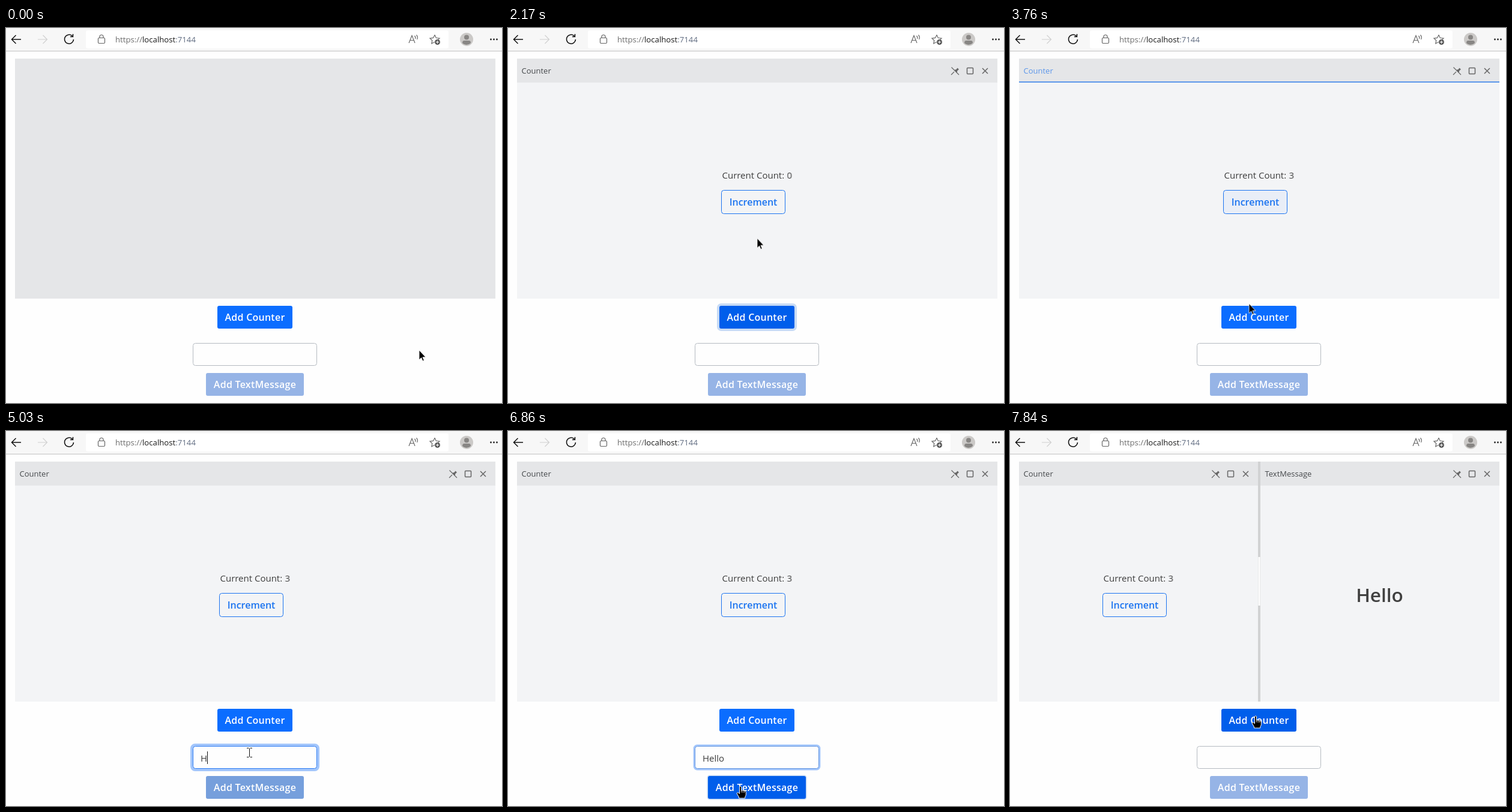
Animation of 826 by 625 pixels, one loop 8 s. Source, as an HTML page:

```html
<!DOCTYPE html>
<html lang="en">
<head>
<meta charset="utf-8">
<title>Dock panels</title>
<style>
html, body { margin: 0; width: 100%; height: 100%; overflow: hidden; background: #fefefe; }
svg { display: block; }
text { font-family: "Open Sans", "Noto Sans", sans-serif; white-space: pre; }
.line { fill: none; stroke: #666; stroke-width: 1.2; }
.title { font-size: 13px; fill: #45484b; }
.body { font-size: 15px; fill: #3c3c3c; }
.label { font-size: 16px; font-weight: 600; text-anchor: middle; fill: #fff; }
.ring { fill: none; stroke-width: 0; }

#stage * { animation-duration: 8s; animation-iteration-count: infinite; animation-timing-function: linear; }
#stage .step { animation-timing-function: step-end; }

#pane { animation-name: pane; }
@keyframes pane { 0% { opacity: 0 } 18.75%, 100% { opacity: 1 } }
#second { animation-name: second; }
@keyframes second { 0% { opacity: 0 } 87.875%, 100% { opacity: 1 } }
#tools { animation-name: tools; }
@keyframes tools { 0% { transform: none } 87.875%, 100% { transform: translateX(-402px) } }
#content { animation-name: content; }
@keyframes content { 0% { transform: none } 87.875%, 100% { transform: translateX(-201px) } }

#name { animation-name: name; }
@keyframes name { 0%, 32.4%, 53.9%, 100% { fill: #45484b } 34%, 52% { fill: #5b96ea } }
#under { animation-name: under; }
@keyframes under { 0%, 32.4%, 53.9%, 100% { opacity: 0 } 34%, 52% { opacity: 1 } }
#inc { animation-name: inc; }
@keyframes inc { 0%, 28.4%, 53.9%, 100% { fill: #f3f4f6 } 30.2%, 52% { fill: #e9eef7 } }
#reel { animation-name: reel; }
@keyframes reel {
  0% { transform: none }
  32.4% { transform: translateY(-20px) }
  37% { transform: translateY(-40px) }
  41.75%, 100% { transform: translateY(-60px) }
}

#add { animation-name: add; }
@keyframes add {
  0%, 11.6%, 34.3%, 47.2%, 50%, 96.7% { fill: #0b6dff }
  13.4%, 32.4%, 98%, 100% { fill: #005eeb }
  48.2% { fill: #0766f6 }
}
#addRing { animation-name: addRing; stroke: #c8dbf5; }
@keyframes addRing { 0%, 18%, 34.3%, 100% { stroke-width: 0 } 19.5%, 32.4% { stroke-width: 8px } }

#field { animation-name: field; }
@keyframes field { 0%, 52%, 86.9%, 100% { stroke: #b5bac1 } 53.9%, 85% { stroke: #2b7bf3 } }
#fieldRing { animation-name: fieldRing; stroke: #a3c6fb; }
@keyframes fieldRing { 0%, 52%, 86.9%, 100% { stroke-width: 0 } 53.9%, 85% { stroke-width: 8px } }
#typing { animation-name: typing; }
@keyframes typing {
  0%, 87.875%, 100% { transform: none }
  62.875% { transform: translateX(11px) }
  64.375% { transform: translateX(19.5px) }
  67% { transform: translateX(23.3px) }
  68.5% { transform: translateX(27.1px) }
  70% { transform: translateX(36.3px) }
}
#caret { animation-name: caret; }
@keyframes caret {
  0%, 58.625%, 77.375%, 85%, 100% { opacity: 0 }
  52%, 62.875%, 83.25% { opacity: 1 }
}

#send { animation-name: send; }
@keyframes send {
  0%, 62.5%, 89.4%, 100% { fill: #96b4e6 }
  62.875% { fill: #779fdc }
  64.4%, 81.5% { fill: #0b6dff }
  83.4%, 87.875% { fill: #005eeb }
}
#sendRing { animation-name: sendRing; stroke: #c8dbf5; }
@keyframes sendRing { 0%, 85%, 88%, 100% { stroke-width: 0 } 86.9%, 87.875% { stroke-width: 8px } }

#cursor { animation-name: cursor; }
@keyframes cursor {
  0% { transform: translate(688px, 537px) }
  7.125% { transform: translate(688px, 537px); animation-timing-function: cubic-bezier(.4, 0, .55, .9) }
  12.625% { transform: translate(433px, 487px); animation-timing-function: ease-out }
  14.125% { transform: translate(418px, 482px) }
  24.875% { transform: translate(418px, 482px); animation-timing-function: cubic-bezier(.4, 0, .8, .7) }
  27.125% { transform: translate(415px, 351px); animation-timing-function: ease-out }
  30.25% { transform: translate(408px, 294px) }
  44.75% { transform: translate(408px, 294px); animation-timing-function: cubic-bezier(.4, 0, .8, .7) }
  47% { transform: translate(398px, 459px); animation-timing-function: ease-out }
  51% { transform: translate(405px, 536px) }
  79.625% { transform: translate(405px, 536px); animation-timing-function: ease-in-out }
  82.75% { transform: translate(387px, 592px) }
  93.75% { transform: translate(387px, 592px); animation-timing-function: ease-in-out }
  98%, 100% { transform: translate(409px, 475px) }
}
#arrow { animation-name: arrow; }
@keyframes arrow {
  0%, 25.6%, 45%, 48.2%, 80.9%, 89.4%, 96% { opacity: 1 }
  11.75%, 28.3%, 47.2%, 49.3%, 81.6%, 95.1%, 96.7%, 100% { opacity: 0 }
}
#hand { animation-name: hand; }
@keyframes hand {
  0%, 25.6%, 45%, 48.2%, 89.4% { opacity: 0 }
  11.75%, 28.3%, 47.2%, 81.6%, 96.7%, 100% { opacity: 1 }
  49.3% { opacity: 0 }
}
#beam { animation-name: beam; }
@keyframes beam { 0%, 80.9%, 96%, 100% { opacity: 0 } 49.3%, 95.1% { opacity: 1 } }
</style>
</head>
<body>
<svg id="stage" width="826" height="625" viewBox="0 0 826 625">
  <defs>
    <g id="icons" class="line">
      <path d="M738.5 65.5l12.5 12.5M738 78l5-5"/>
      <path d="M743 70l3.500-1 2-2.500 2.500 2.500-2.500 2-1 3.500z" fill="#666" stroke="none"/>
      <rect x="764.500" y="66.500" width="10" height="10" rx="1" stroke-width="1.500"/>
      <path d="M790 67l9 9M799 67l-9 9" stroke-width="1.500"/>
    </g>
  </defs>

  <!-- browser bar -->
  <rect width="826" height="38" fill="#f7f7f7"/>
  <rect y="38" width="826" height="1" fill="#c2c2c2"/>
  <rect x="133" y="4" width="604" height="30" rx="3" fill="#fff"/>
  <g class="line">
    <path d="M25 19H9.500M16.500 12l-7 7 7 7" stroke="#111" stroke-width="1.500"/>
    <path d="M53 19h15.500M61.500 12l7 7-7 7" stroke="#d0d0d0"/>
    <path d="M110.500 13.500A7.500 7.500 0 1 0 112.500 19M111.500 10v4.500H107" stroke="#111" stroke-width="1.500"/>
    <rect x="153.500" y="16.500" width="11" height="9" rx="1.500"/>
    <path d="M156 16v-1.500a3 3 0 0 1 6 0V16"/>
    <path d="M671 25l5-12.500 5 12.500M673 20.500h6M680.500 13q2 2 1 5M683.500 11.500q3 3.500 1 7.500"/>
    <path d="M714 11.500l2.300 5 5.700.6-4.200 3.800M713.500 23.500l-4.700 2.500 1-5.300-3.800-3.600 5.600-.7 2.400-4.900"/>
  </g>
  <circle cx="718.500" cy="23.500" r="4.500" fill="#5c5c5c"/>
  <path d="M716 23.500h5M718.500 21v5" stroke="#fff"/>
  <circle cx="767" cy="19" r="11" fill="#cbc9c7"/>
  <g fill="#888684">
    <circle cx="767" cy="15.500" r="4"/>
    <path d="M760 25q0-4 3-4h8q3 0 3 4-3 3-7 3t-7-3z"/>
  </g>
  <g fill="#222">
    <circle cx="807.500" cy="19" r="1.400"/><circle cx="812.500" cy="19" r="1.400"/><circle cx="817.500" cy="19" r="1.400"/>
  </g>
  <text x="182" y="24" font-size="13.200" fill="#6d6d6d">https://<tspan fill="#181818">localhost</tspan><tspan fill="#5f6b80">:7144</tspan></text>

  <!-- dock area -->
  <rect x="15" y="51" width="800" height="400" fill="#e5e6e8"/>
  <g id="pane" class="step">
    <rect x="15" y="91" width="800" height="360" fill="#f3f4f6"/>
    <text id="name" class="title" x="22.500" y="76">Counter</text>
    <rect id="under" x="15" y="89" width="800" height="2" fill="#5b96ea"/>
    <g id="tools" class="step"><use href="#icons"/></g>
    <g id="content" class="step">
      <text class="body" x="356.500" y="251">Current Count:</text>
      <svg x="464.500" y="236" width="12" height="20">
        <g id="reel" class="step body">
          <text y="15">0</text><text y="35">1</text><text y="55">2</text><text y="75">3</text>
        </g>
      </svg>
      <rect id="inc" x="355.500" y="270.500" width="106" height="39" rx="4" fill="#f3f4f6" stroke="#1a73f0"/>
      <text class="label" x="408.500" y="296" style="fill:#1a73f0">Increment</text>
    </g>
  </g>
  <g id="second" class="step">
    <rect x="413" y="51" width="4" height="400" fill="#d1d2d3"/>
    <rect x="413.500" y="210" width="3" height="81" fill="#fff"/>
    <text class="title" x="424.500" y="76">TextMessage</text>
    <use href="#icons"/>
    <text class="label" x="615.500" y="285" style="font-size:31.500px;fill:#404040">Hello</text>
  </g>

  <!-- form -->
  <rect id="addRing" class="ring" x="352" y="463" width="125" height="38" rx="3"/>
  <rect id="add" x="352" y="463" width="125" height="38" rx="3" fill="#0b6dff"/>
  <text class="label" x="414.500" y="488" letter-spacing=".25">Add Counter</text>

  <rect id="fieldRing" class="ring" x="311" y="525" width="207" height="38" rx="4"/>
  <rect id="field" x="311.500" y="525.500" width="206" height="37" rx="4" fill="#fefefe" stroke="#b5bac1"/>
  <text class="body" x="324" y="551">Hello</text>
  <g id="typing" class="step">
    <rect x="324" y="534" width="42" height="21" fill="#fefefe"/>
    <rect id="caret" class="step" x="324" y="534" width="1" height="21" fill="#111"/>
  </g>

  <rect id="sendRing" class="ring" x="333" y="575" width="163" height="38" rx="3"/>
  <rect id="send" x="333" y="575" width="163" height="38" rx="3" fill="#96b4e6"/>
  <text class="label" x="414.500" y="600" letter-spacing=".25">Add TextMessage</text>

  <!-- pointer -->
  <g id="cursor">
    <path id="arrow" class="step" d="M0 0V16l3.600-3.400 2.400 5.400 2.300-1-2.400-5.300H11z" stroke="#fff" stroke-width=".8"/>
    <g id="hand" class="step" stroke="#fff">
      <path d="M-1.500.8Q0-1.200 1.500.8V7q1.600-1 2.600.4 1.600-.8 2.600.5 2.200-.6 2.600 1.600V14q0 2-1.500 3.500V20H-2.500V18L-5.500 13q-1-2 .8-2.400 1.500 0 3.200 2z"/>
      <path d="M1.500 7v3.500M4.100 7.500v3.500M6.700 8v3" stroke-width=".8"/>
    </g>
    <path id="beam" class="step" d="M-4-7.500h3.500M1.500-7.500H5M.5-7V7M-4 7.500h3.500M1.500 7.500H5" fill="none" stroke="#111"/>
  </g>
</svg>
</body>
</html>
```
